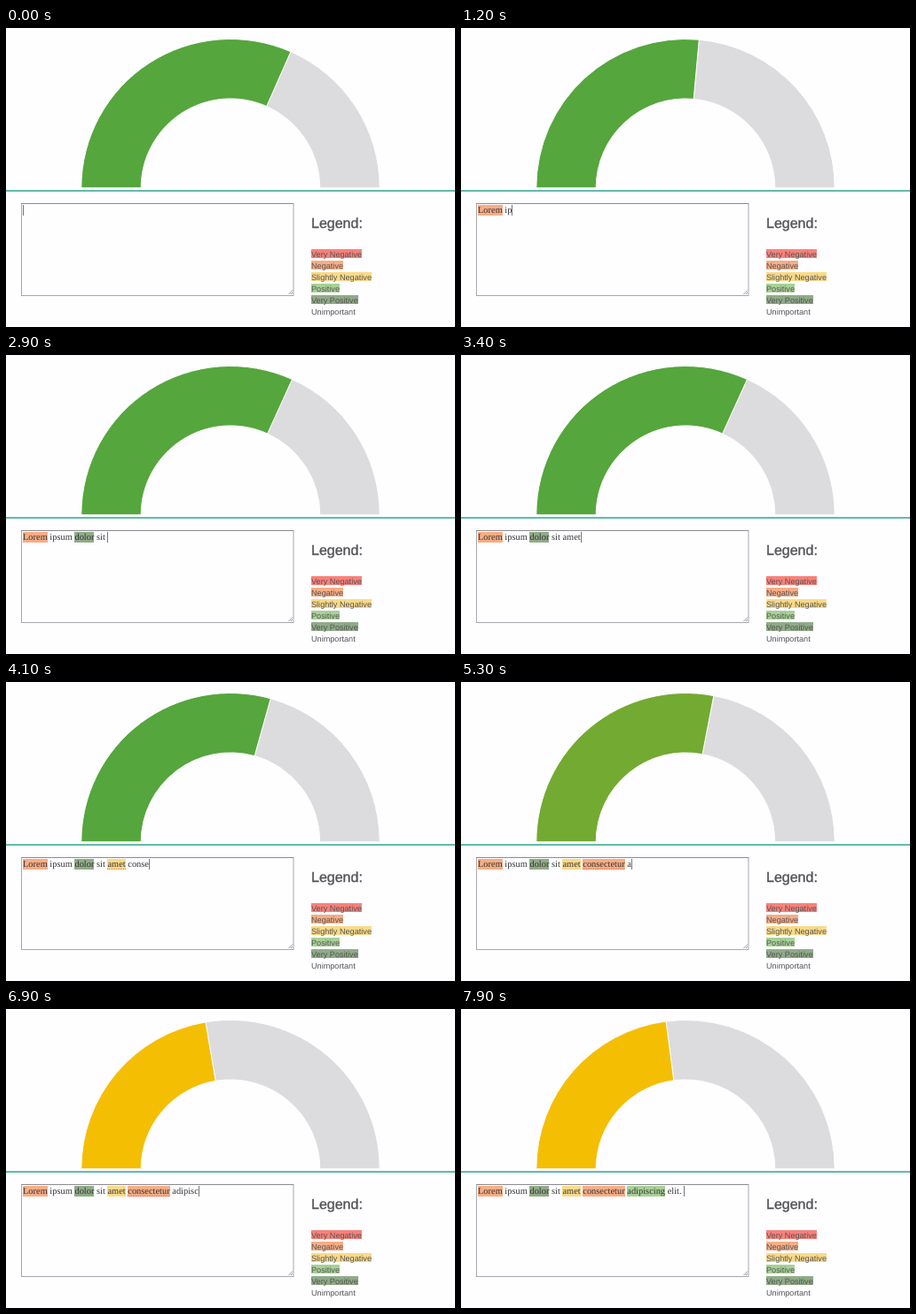
Write an HTML page that moves like this. It is 506 px wide and 338 px high and loops after 8 s.

```html
<!DOCTYPE html>
<html lang="en">
<head>
<meta charset="utf-8">
<title>Sentiment gauge</title>
<style>
  html, body { margin: 0; width: 100%; height: 100%; overflow: hidden; background: #fefdff; }
  body { position: relative; text-rendering: geometricPrecision; }
  svg { position: absolute; left: 0; top: 0; }
  #editor, .legend, h2 { position: absolute; margin: 0; white-space: pre; }
  #editor {
    left: 19px; top: 200px; line-height: 12px; color: #333;
    font-family: "Liberation Serif", "Times New Roman", serif; font-size: 10.42px;
  }
  #editor span { position: relative; padding: .5px 0; }
  #editor .misspelt {
    background-image: repeating-linear-gradient(90deg, #d33a 0 1px, transparent 1px 2px);
    background-size: 100% 1px; background-position: 0 100%; background-repeat: no-repeat;
  }
  #caret { display: inline-block; width: 1px; height: 12px; margin-right: -1px; background: #777; vertical-align: top; }
  h2, .legend { left: 344px; font-family: "Liberation Sans", Arial, sans-serif; color: #555; }
  h2 { top: 212px; font-size: 16px; line-height: 19px; font-weight: 400; -webkit-text-stroke: .4px #555; }
  .legend { top: 249px; font-size: 9.13px; line-height: 13px; }
  .legend div { height: 13px; }
  .legend span { padding-top: .5px; }
  .worst { background-color: #f9817a; }
  .bad { background-color: #f7ad84; }
  .poor { background-color: #fada88; }
  .good { background-color: #a8d196; }
  .best { background-color: #90ab88; }
</style>
</head>
<body>
<svg width="506" height="338" viewBox="0 0 506 338">
  <g stroke="#fefdff">
    <path id="rest" fill="#dcdbdd"/>
    <path id="value"/>
  </g>
  <rect y="183.2" width="506" height="1.7" fill="#48b09d"/>
  <rect x="17.5" y="198.5" width="306.5" height="104" fill="#fefdff" stroke="#a8a8ac"/>
  <path d="M17 198.5H324" stroke="#8c8c90"/>
  <path d="M318.5 301L323 296.5M321 301L323 299" stroke="#777" stroke-width=".8"/>
</svg>
<div id="editor"></div>
<h2>Legend:</h2>
<div class="legend"><div><span class="worst">Very Negative</span></div><div><span class="bad">Negative</span></div><div><span class="poor">Slightly Negative</span></div><div><span class="good">Positive</span></div><div><span class="best">Very Positive</span></div><div><span>Unimportant</span></div></div>
<script>
const LOOP = 8000, STEP = 100;
const GREEN = [85, 166, 60], YELLOW = [244, 190, 2];
const CENTER = { x: 253, y: 180.7 }, OUTER = 168.2, INNER = 100.8;

// mark: highlight class; spell: span of time with a spelling underline
const words = [
  { text: "Lorem", mark: "bad" },
  { text: "ipsum" },
  { text: "dolor", mark: "best" },
  { text: "sit" },
  { text: "amet", mark: "poor", spell: [3500, 4700] },
  { text: "consectetur", mark: "bad", spell: [5100, 7300] },
  { text: "adipiscing", mark: "good" },
  { text: "elit." }
];

// [time, characters typed]
const typing = [[0, 0], [100, 1], [900, 6], [1800, 12], [2100, 14], [2500, 18], [2900, 22],
  [3500, 27], [4100, 32], [4300, 32], [5100, 39], [5500, 41], [6900, 46], [7300, 50], [7900, 56], [8000, 56]];

// Gauge moves; angles in degrees from the left end
const START_ANGLE = 113.8;
const moves = [
  { at: 50, angle: 102 },
  { at: 850, angle: 94.4 },
  { at: 2400, angle: 114.4 },
  { at: 3450, angle: 105.6 },
  { at: 5120, angle: 80.4 },
  { at: 7220, angle: 82.5 }
];
const MOVE_TIME = 500;

const byId = id => document.getElementById(id);
const mix = (a, b, k) => a + (b - a) * k;
const clamp = k => Math.min(1, Math.max(0, k));
const ease = k => k < .5 ? 4 * k ** 3 : 1 - 4 * (1 - k) ** 3;
const progress = (t, at) => ease(clamp((t - at) / MOVE_TIME));

function typedCount(t) {
  const i = typing.findIndex(([time]) => time > t);
  const [t0, n0] = typing[i - 1], [t1, n1] = typing[i];
  return Math.floor(mix(n0, n1, (t - t0) / (t1 - t0)) + 1e-6);
}

function point(radius, degrees) {
  const a = degrees * Math.PI / 180;
  return `${CENTER.x - radius * Math.cos(a)} ${CENTER.y - radius * Math.sin(a)}`;
}

function band(from, to) {
  return `M${point(OUTER, from)}A${OUTER} ${OUTER} 0 0 1 ${point(OUTER, to)}` +
    `L${point(INNER, to)}A${INNER} ${INNER} 0 0 0 ${point(INNER, from)}Z`;
}

function drawGauge(t) {
  const angle = moves.reduce((a, m) => mix(a, m.angle, progress(t, m.at)), START_ANGLE);
  const tint = progress(t, 5120);
  const color = GREEN.map((c, i) => Math.round(mix(c, YELLOW[i], tint)));
  byId("value").setAttribute("d", band(0, angle));
  byId("value").setAttribute("fill", `rgb(${color})`);
  byId("rest").setAttribute("d", band(angle, 180));
}

function drawText(t) {
  let left = typedCount(t), html = "";
  for (const { text, mark = "", spell } of words) {
    if (left <= 0) break;
    const done = left > text.length;
    const misspelt = spell && t >= spell[0] && t < spell[1] ? " misspelt" : "";
    html += `<span class="${done ? mark + misspelt : ""}">${text.slice(0, left)}</span>`;
    if (done) html += " ";
    left -= text.length + 1;
  }
  byId("editor").innerHTML = html + '<i id="caret"></i>';
}

const start = performance.now();
let last = -1;
function frame() {
  const elapsed = (performance.now() - start) % LOOP;
  const t = Math.floor(elapsed / STEP) * STEP;
  if (t !== last) {
    drawGauge(t);
    drawText(t);
    last = t;
  }
  requestAnimationFrame(frame);
}
frame();
</script>
</body>
</html>
```
